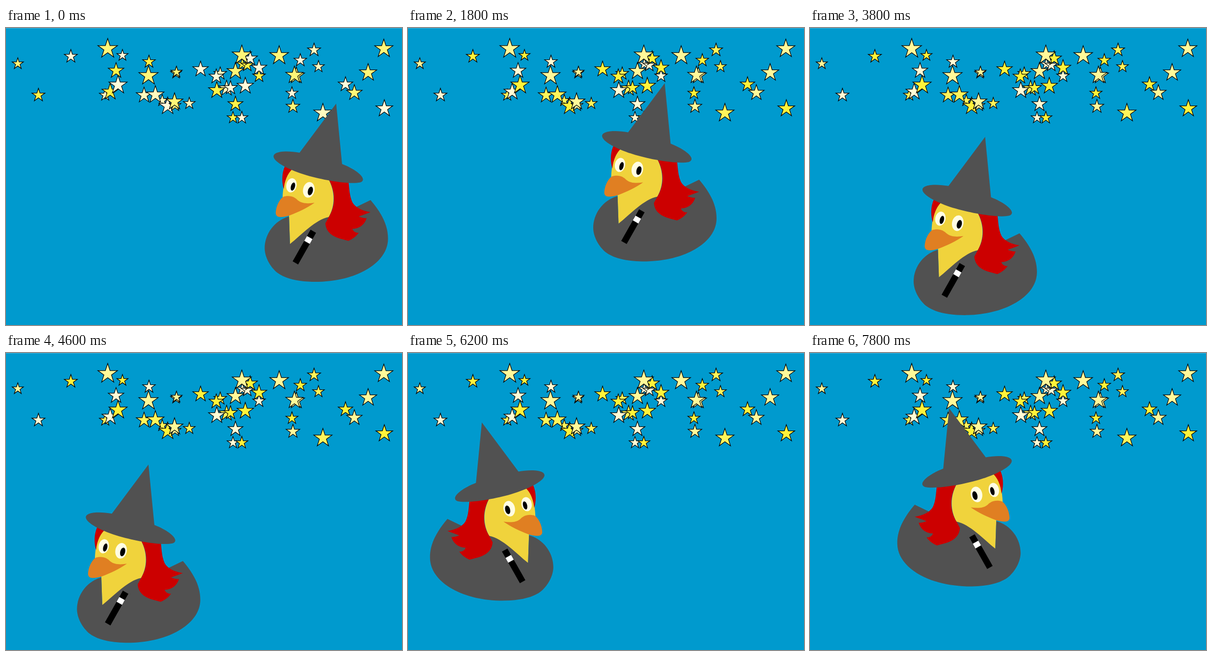
Recreate the animation shown at these times as an HTML page. Size 806 by 605 pixels, loop 8 s.

```html
<!DOCTYPE html>
<html lang="en">
<head>
<meta charset="utf-8">
<title>Witch duck</title>
<style>
  html, body { margin: 0; width: 100%; height: 100%; overflow: hidden; background: #009ace; }
  svg { display: block; width: 100vw; height: 100vh; }
  .star { stroke: #000; stroke-width: 1.25; stroke-miterlimit: 10; }
  .cloth { fill: #515151; }
  .hair { fill: #c00; }
  .eye { fill: #fffde3; }
</style>
</head>
<body>
<svg viewBox="0 0 806 605" preserveAspectRatio="none">
  <rect width="806" height="605" fill="#009ace"/>
  <rect width="806" height="1" fill="#40b2da"/>
  <g id="sky"></g>
  <g id="duck">
    <path fill="#f0d33c" d="M563 345C564 318 570 298 582 288L600 270L640 285L657 309C670 334 670 362 657 385L640 420L578 441L576 380Z"/>
    <path class="cloth" d="M576 384C546 392 526.500 420 526.500 449C527 470 541 490 553 499C572 513 603 517.500 636 517C715 515 777 478 777.500 430C778 400 762 374 742 350.500L712 365L657 385C630 390 602 421 578 440Z"/>
    <path class="hair" d="M568 281C561 295 561 315 565.500 328C567 312 572 298 583 287Z"/>
    <path class="hair" d="M656 307C671 333 671 362 657 385L650 398C652 425 680 429 697 433.500C706 430 714 423 718 417C711 418 706 413 705 409C717 409 730 402 734 387C730 388 723 386 718 384C726 381 735 378 742 375C727 373 711 366 705 355C699 342 699 328 697 312Z"/>
    <path class="cloth" d="M672 154L597.500 254C575 250 546 250 544.500 261C544 273 578 290 612 300C650 311 700 319 721 314.500C737 309 717 290 684 277Z"/>
    <ellipse class="eye" rx="10.500" ry="14.500" transform="translate(581 320.500) rotate(11)"/>
    <ellipse rx="4.200" ry="8.500" transform="translate(584 323) rotate(15)"/>
    <ellipse class="eye" rx="11.700" ry="16" transform="translate(616.300 329.700) rotate(11)"/>
    <ellipse rx="5" ry="9" transform="translate(619.500 332) rotate(15)"/>
    <path fill="#e07f22" d="M549 378C549 365 556 349 565 343.500C580 340 588 345 594 351C603 358 615 358 628 356C612 367 595 375 578 381.500C568 385 555 387 551 382.500Q549 380 549 378Z"/>
    <path stroke="#000" stroke-width="12.800" d="M625.500 414L589 478.500"/>
    <path stroke="#fff" stroke-width="12.800" d="M618.200 426.900L612.700 436.600"/>
  </g>
</svg>
<script>
const STEP = 200, STEPS = 40, TURN = 30;
const SPEED = 16.61, BOB = 63.2, MIRROR = 1304;

// Paleness on even and odd steps, then x, y, radius of each star; later groups lie on top.
const groups = [
  { pale: [.75, .28], stars: [
    [202, 136, 13], [281, 136, 17], [318, 147, 13], [304, 135, 19], [373, 153, 13],
    [436, 92, 14], [449, 122, 17], [627, 44, 14.5], [636, 78, 13], [645, 172, 20]] },
  { pale: [.2, .85], stars: [
    [66, 136, 14.5], [224, 86, 17], [212, 129, 18], [291, 68, 14], [429, 126, 18],
    [481, 73, 13], [491, 75, 14], [515, 97, 14], [467, 154, 16.5], [462, 182, 13]] },
  { pale: [.88, .13], stars: [
    [132, 57, 14.5], [237, 55, 12.5], [228, 115, 20], [329, 158, 19], [396, 83, 17],
    [428, 98, 16], [457, 121, 15], [487, 117, 18], [497, 61, 16], [515, 80, 17],
    [480, 182, 13.5], [599, 65, 14], [582, 132, 13.5], [691, 114, 16], [770, 163, 18.5]] },
  { pale: [.42, .57], stars: [
    [24, 72, 12.5], [207, 41, 21.5], [290, 96, 21], [346, 91.5, 12], [347, 89, 12.5],
    [344, 157, 13], [343, 149, 18.5], [467, 87, 18.5], [480, 54, 21], [556, 55, 20.5],
    [591, 96, 18], [587, 95, 19], [584, 159, 15], [709, 131, 17], [737, 90, 19],
    [769, 41, 20]] }
];

const sky = document.getElementById('sky');
const duck = document.getElementById('duck');
const radians = degrees => degrees * Math.PI / 180;

function svg(name, attributes, parent) {
  const node = document.createElementNS(sky.namespaceURI, name);
  for (const key in attributes) node.setAttribute(key, attributes[key]);
  return parent.appendChild(node);
}

function starPoints(x, y, size) {
  const r = size - .4, cy = y + size * .06;
  return Array.from({ length: 10 }, (_, i) => {
    const d = i % 2 ? r * .382 : r, a = radians(i * 36);
    return `${(x + d * Math.sin(a)).toFixed(2)},${(cy - d * Math.cos(a)).toFixed(2)}`;
  }).join(' ');
}

function yellow(pale) {
  return `rgb(255,${Math.round(241 + 14 * pale)},${Math.round(30 + 215 * pale)})`;
}

for (const group of groups) {
  group.node = svg('g', { class: 'star' }, sky);
  for (const [x, y, r] of group.stars) svg('polygon', { points: starPoints(x, y, r) }, group.node);
}

function draw(n) {
  for (const { node, pale } of groups) node.setAttribute('fill', yellow(pale[n % 2]));
  const dx = -SPEED * (TURN - Math.abs(n - TURN));
  const swing = k => Math.cos(radians((k - 6.5) * 12));
  const dy = BOB * (swing(0) - swing(n));
  duck.setAttribute('transform', n < TURN
    ? `translate(${dx} ${dy})`
    : `translate(${dx + MIRROR} ${dy}) scale(-1 1)`);
}

const start = performance.now();
let shown = -1;
function tick() {
  const n = Math.floor((performance.now() - start) / STEP) % STEPS;
  if (n !== shown) draw(shown = n);
  requestAnimationFrame(tick);
}
tick();
</script>
</body>
</html>
```
